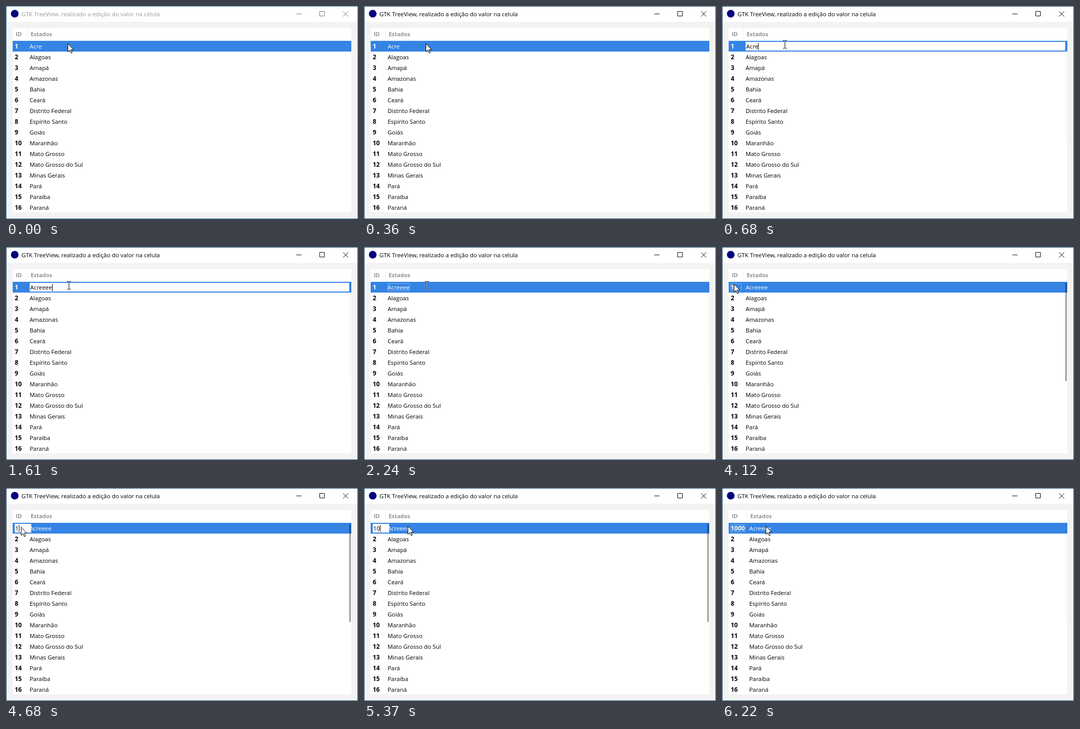
An HTML page with a canvas for the animation above (6.93 s loop, 685 by 416 pixels).

```html
<!DOCTYPE html>
<html lang="pt">
<head>
<meta charset="utf-8">
<style>
html, body { margin: 0; width: 100%; height: 100%; overflow: hidden; }
canvas { display: block; }
</style>
</head>
<body>
<canvas id="stage" width="685" height="416"></canvas>
<script>
const ctx = document.getElementById('stage').getContext('2d');
const LOOP = 6930, BLUE = '#3584e4';
const FAMILY = '"Open Sans", "Noto Sans", sans-serif';
const REGULAR = '11.4px ' + FAMILY;
const HEADER = 'bold 10.9px ' + FAMILY;
const BOLD = 'bold 12px ' + FAMILY;
const STATES = ['Acre', 'Alagoas', 'Amapá', 'Amazonas', 'Bahia', 'Ceará',
  'Distrito Federal', 'Espírito Santo', 'Goiás', 'Maranhão', 'Mato Grosso',
  'Mato Grosso do Sul', 'Minas Gerais', 'Pará', 'Paraíba', 'Paraná'];

// Each track is a list of [start, value...]; values hold until the next start.
const POINTER = [
  [0, 'arrow', 120, 73], [450, 'beam', 127, 70], [610, 'beam', 124, 73], [680, 'beam', 122, 75],
  [3010, 'arrow', 95, 76], [3090, 'arrow', 60, 66], [3170, 'arrow', 22, 52], [3250, 'none'],
  [3500, 'arrow', 2, 90], [3580, 'arrow', 8, 90], [3660, 'arrow', 13, 87],
  [3740, 'arrow', 17, 82], [3810, 'arrow', 20, 76], [3890, 'arrow', 22, 70],
  [4030, 'arrow', 10, 58], [4120, 'arrow', 23, 72], [4360, 'arrow', 26, 74],
  [4440, 'arrow', 29, 76], [4740, 'arrow', 45, 69], [4820, 'arrow', 68, 64], [4900, 'arrow', 85, 74]];
const NAME = [[0, 'Acre'], [1140, 'Acree'], [1370, 'Acreee'], [1610, 'Acreeee']];
const ID = [[0, '1'], [5370, '10'], [5520, '100'], [5760, '1000']];
const SCROLL = [[0, 0], [450, .025], [4030, .2], [4120, .38],
  [5760, .28], [5920, .18], [6070, .09], [6220, .025]];
const at = (track, t) => track.filter(k => k[0] <= t).pop().slice(1);

function rect(color, x, y, w, h) {
  ctx.fillStyle = color;
  ctx.fillRect(x, y, w, h);
}

function text(str, x, y, color, font = REGULAR) {
  ctx.font = font;
  ctx.fillStyle = color;
  ctx.fillText(str, x, y);
}

function line(color, path) {
  ctx.strokeStyle = color;
  ctx.lineWidth = 1;
  ctx.stroke(new Path2D(path));
}

function drawWindow(active) {
  rect(active ? '#17466b' : '#2c7cad', 0, 0, 685, 416);
  rect('#f3f3f3', 1, 1, 683, 414);
  rect('#fff', 1, 1, 683, 30);
  ctx.fillStyle = '#000080';
  ctx.beginPath();
  ctx.arc(17, 15, 7.5, 0, 7);
  ctx.fill();
  text('GTK TreeView, realizado a edição do valor na celula', 30, 20, active ? '#000' : '#999');
  line(active ? '#000' : '#777',
    'M565 15.5h10 M610.5 10.5h9v9h-9z M656 10.5l10 10 M666 10.5l-10 10');
}

function drawTable(id, name, shift) {
  rect('#fff', 13, 43, 659, 360);
  rect('#f0f0f0', 41 + shift, 43, 1, 25);
  text('ID', 19, 59, '#929595', HEADER);
  text('Estados', 48 + shift, 59, '#929595', HEADER);
  rect(BLUE, 13, 68, 659, 21);
  STATES.forEach((state, i) => {
    const color = i ? '#000' : '#fff', y = 83 + 21 * i;
    text(i ? i + 1 : id, 17, y, color, BOLD);
    text(i ? state : name, 46 + shift, y, color);
  });
}

function drawFocus(x, w) {
  ctx.setLineDash([1, 1]);
  line('rgba(255,255,255,.75)', `M${x + .5} 71.5h${w}v14h${-w}z`);
  ctx.setLineDash([]);
}

function drawEntry(str, x, w, selected) {
  rect('#fff', x, 70, w, 17);
  ctx.font = REGULAR;
  const end = Math.round(ctx.measureText(str).width);
  if (selected) rect(BLUE, x + 1, 71, end, 15);
  else rect('#000', x + 1 + end, 72, 1, 14);
  text(str, x + 1, 83, selected ? '#fff' : '#000');
}

function drawScrollbar(alpha) {
  ctx.fillStyle = `rgba(0,0,0,${alpha})`;
  ctx.beginPath();
  ctx.roundRect(668, 70, 3, 192, 1.5);
  ctx.fill();
}

function drawPointer(kind, x, y) {
  ctx.save();
  ctx.translate(x, y);
  if (kind === 'arrow') {
    const arrow = 'M.5 .5v16l3.6-3.5 2.7 6 2.2-1-2.6-5.8h5.1z';
    ctx.fillStyle = '#fff';
    ctx.fill(new Path2D(arrow));
    line('#000', arrow);
  } else if (kind === 'beam') {
    // The text pointer inverts what lies under it.
    ctx.globalCompositeOperation = 'difference';
    line('#fff', 'M-3 -7.5h3 M1 -7.5h3 M.5 -7v14 M-3 7.5h3 M1 7.5h3');
  }
  ctx.restore();
}

function draw(t) {
  const [name] = at(NAME, t), [id] = at(ID, t);
  const done = t >= 6220;
  drawWindow(t >= 360);
  drawTable(done ? id : '1', t < 2240 ? 'Acre' : name, done ? 7 : 0);

  if (t >= 450 && t < 2240) drawEntry(name, 46, 622, t < 610);
  else if (t >= 2240 && t < 4120) drawFocus(46, 42);
  else if (t >= 4120 && t < 4600) drawFocus(17, 20);
  else if (t >= 4600 && !done) drawEntry(id, 17, 32, t < 4680);
  else if (done) drawFocus(17, 28);

  drawScrollbar(at(SCROLL, t)[0]);
  drawPointer(...at(POINTER, t));
}

const start = performance.now();
function tick() {
  draw((performance.now() - start) % LOOP);
  requestAnimationFrame(tick);
}
tick();
</script>
</body>
</html>
```
